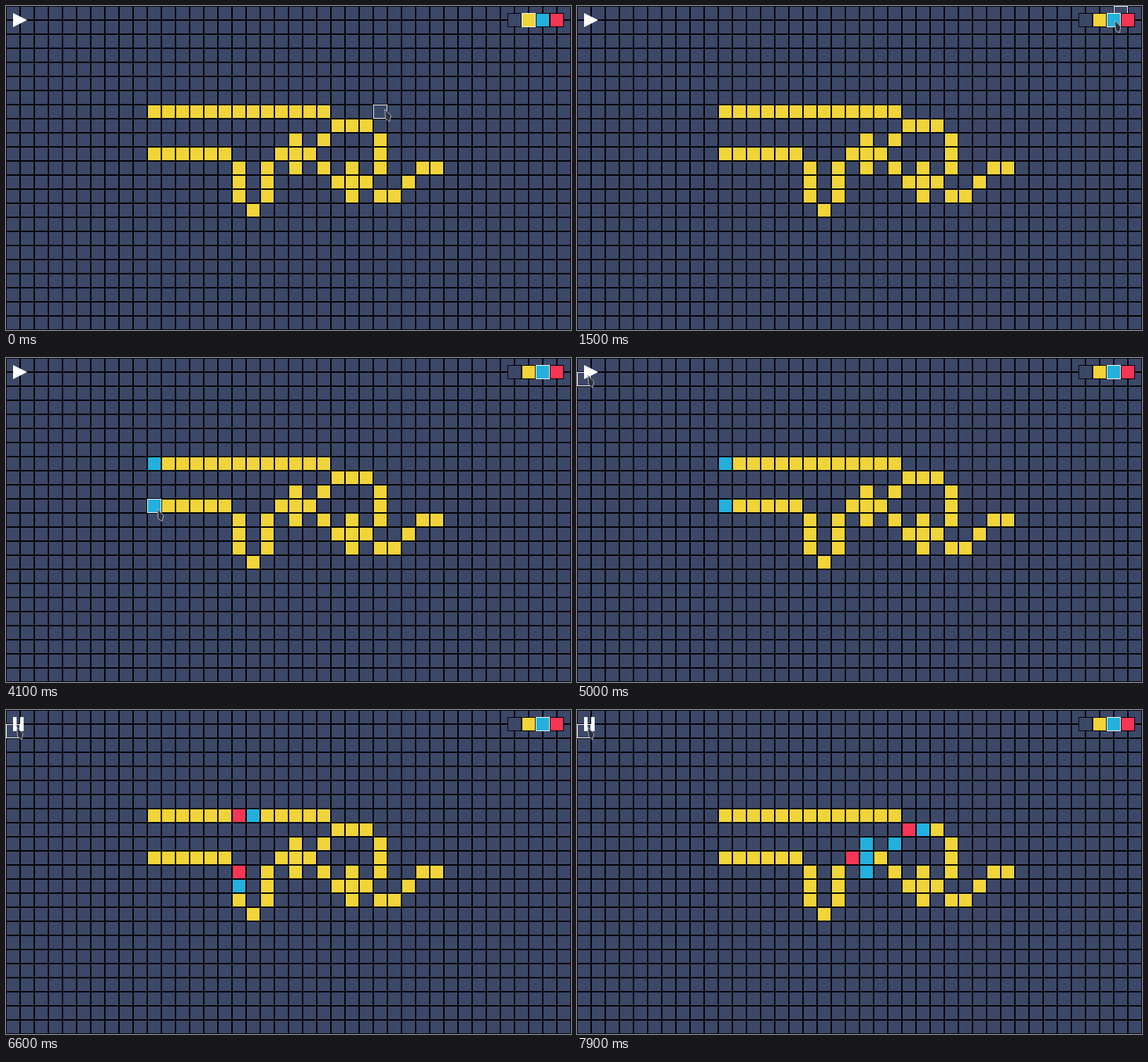
These frames come from a looping animation (800 by 460 pixels, 8000 ms). An HTML page with a canvas:

```html
<!DOCTYPE html>
<html>
<head>
<meta charset="utf-8">
<style>
  html, body { margin: 0; width: 800px; height: 460px; overflow: hidden; background: #000; }
  canvas { display: block; }
</style>
</head>
<body>
<canvas id="stage" width="800" height="460"></canvas>
<script>
const ctx = document.getElementById('stage').getContext('2d');
const LOOP = 8000, TICK = 100, SIZE = 20, COLS = 40, ROWS = 23;
const EMPTY = 0, WIRE = 1, HEAD = 2, TAIL = 3;
const COLORS = ['#3c4868', '#f0d43a', '#23b0dc', '#f63654'];
const PICK = 1300, CLICK_A = 2700, CLICK_B = 3700, RUN = 5300, RUN_STEP = 200;

// Pointer stops: leave and arrive times, position
const STOPS = [
  { leave: 0, arrive: 0, x: 536, y: 146 },
  { leave: 300, arrive: 1200, x: 761, y: 19.5 },
  { leave: 1700, arrive: 2600, x: 213, y: 146 },
  { leave: 2700, arrive: 3400, x: 214, y: 214 },
  { leave: 4100, arrive: 4900, x: 15, y: 24 }
];

const at = (col, row) => row * COLS + col;

// Lays wire along compass runs such as "12e 1se"
function lay(grid, col, row, route) {
  grid[at(col, row)] = WIRE;
  for (const run of route.split(' ')) {
    const has = d => run.includes(d);
    for (let n = parseInt(run); n > 0; n--) {
      col += has('e') - has('w');
      row += has('s') - has('n');
      grid[at(col, row)] = WIRE;
    }
  }
}

function buildCircuit() {
  const grid = new Uint8Array(COLS * ROWS);
  lay(grid, 10, 7, '12e 1se 2e 1se 2s 1sw 2w 2nw 2ne');
  lay(grid, 10, 10, '5e 1se 2s 1se 1ne 2n 1ne 2e');
  lay(grid, 20, 9, '2s');
  lay(grid, 24, 11, '2s');
  lay(grid, 25, 12, '1se 1e 2ne 1e');
  return grid;
}

function countHeads(grid, i) {
  let n = 0;
  for (let dy = -1; dy <= 1; dy++)
    for (let dx = -1; dx <= 1; dx++)
      if (grid[i + dy * COLS + dx] === HEAD) n++;
  return n;
}

// Wireworld rules
function step(grid) {
  return grid.map((cell, i) => {
    if (cell === HEAD) return TAIL;
    if (cell === TAIL) return WIRE;
    if (cell === EMPTY) return EMPTY;
    const n = countHeads(grid, i);
    return n === 1 || n === 2 ? HEAD : WIRE;
  });
}

const circuit = buildCircuit();

function gridAt(t) {
  let grid = circuit.slice();
  if (t >= CLICK_A) grid[at(10, 7)] = HEAD;
  if (t >= CLICK_B) grid[at(10, 10)] = HEAD;
  for (let s = RUN; s <= t; s += RUN_STEP) grid = step(grid);
  return grid;
}

const ease = p => p * p * (3 - 2 * p);

function pointerAt(t) {
  let { x, y } = STOPS[0];
  for (const stop of STOPS.slice(1)) {
    if (t < stop.leave) break;
    const p = ease(Math.min(1, (t - stop.leave) / (stop.arrive - stop.leave)));
    x += (stop.x - x) * p;
    y += (stop.y - y) * p;
  }
  return [x, y];
}

function box(x, y, color) {
  ctx.fillStyle = color;
  ctx.fillRect(x + 1, y + 1, SIZE - 2, SIZE - 2);
}

function outline(x, y) {
  ctx.strokeStyle = '#fff';
  ctx.strokeRect(x + 0.5, y + 0.5, SIZE - 1, SIZE - 1);
}

function polygon(points) {
  ctx.beginPath();
  for (const [x, y] of points) ctx.lineTo(x, y);
  ctx.closePath();
}

function drawButton(running) {
  ctx.fillStyle = '#fff';
  if (running) {
    for (const x of [10, 20]) ctx.fillRect(x, 10, 5, 20);
  } else {
    polygon([[10, 10], [30, 20], [10, 30]]);
    ctx.fill();
  }
}

function drawPalette(selected) {
  COLORS.forEach((color, i) => {
    const x = 710 + i * SIZE;
    ctx.fillStyle = '#000';
    ctx.fillRect(x, 10, SIZE, SIZE);
    box(x, 10, color);
    if (i === selected) outline(x, 10);
  });
}

function drawPointer(x, y) {
  polygon([[0.5, 0.5], [9, 9.5], [7, 18], [1.5, 14]].map(([dx, dy]) => [x + dx, y + dy]));
  ctx.fillStyle = '#2b323c';
  ctx.fill();
  ctx.strokeStyle = '#b4b8bc';
  ctx.stroke();
}

function draw(t) {
  ctx.fillStyle = '#000';
  ctx.fillRect(0, 0, COLS * SIZE, ROWS * SIZE);
  gridAt(t).forEach((cell, i) =>
    box(i % COLS * SIZE, Math.floor(i / COLS) * SIZE, COLORS[cell]));

  const [x, y] = pointerAt(t);
  outline(Math.floor(x / SIZE) * SIZE, Math.floor(y / SIZE) * SIZE);
  drawButton(t >= RUN);
  drawPalette(t < PICK ? WIRE : HEAD);
  drawPointer(Math.round(x), Math.round(y));
}

const began = performance.now();
function tick() {
  const t = (performance.now() - began) % LOOP;
  draw(Math.floor(t / TICK) * TICK);
  requestAnimationFrame(tick);
}
tick();
</script>
</body>
</html>
```
